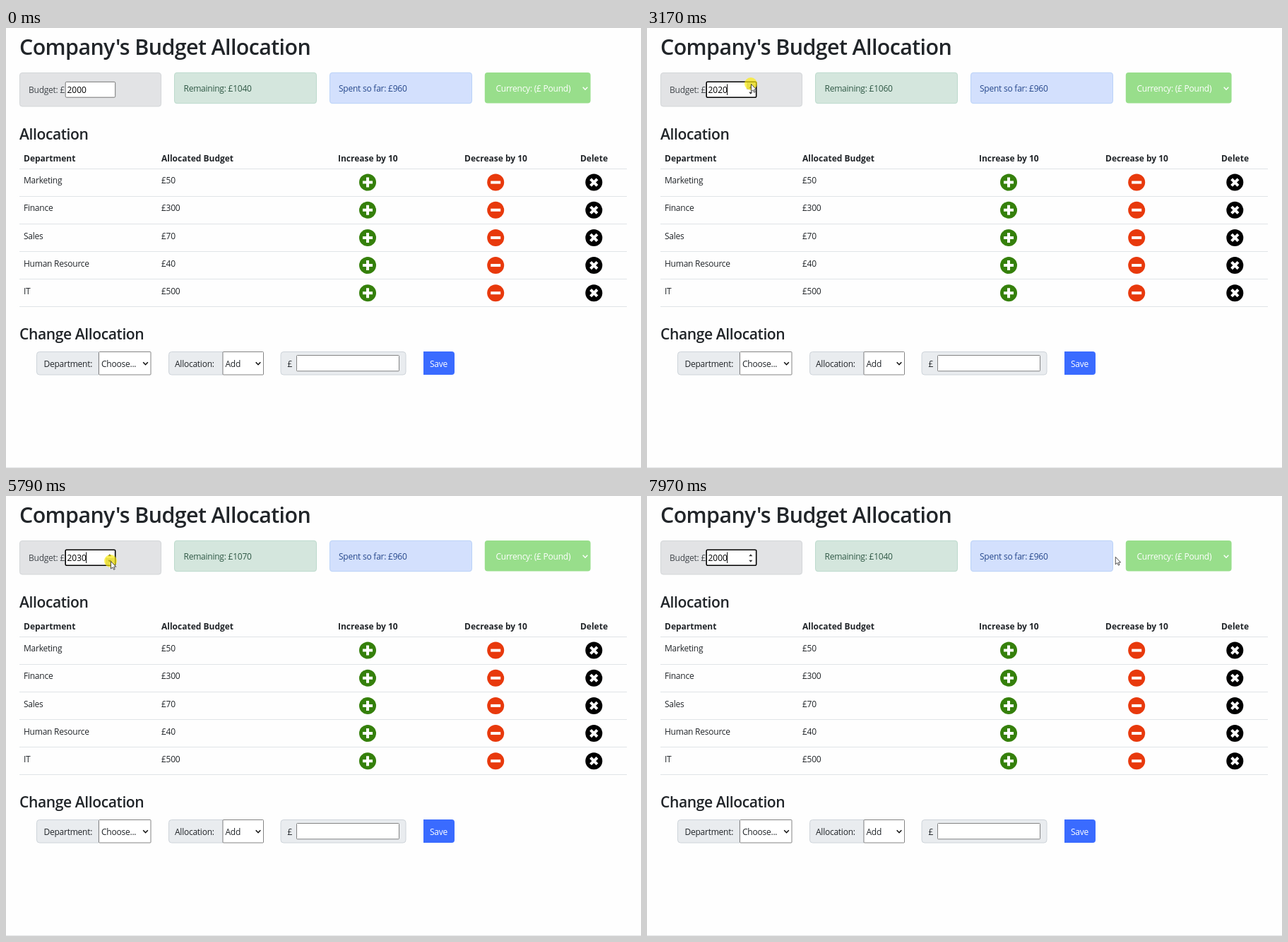
An HTML page that plays this animation: 899x623 px, repeating every 8 s.

```html
<!DOCTYPE html>
<html lang="en">
<head>
<meta charset="utf-8">
<title>Budget Allocation</title>
<style>
  html, body { margin: 0; width: 100%; height: 100%; overflow: hidden; background: #fefefe; }
  svg { display: block; width: 899px; height: 623px; }
  text { font: 12px "Open Sans", "Noto Sans", sans-serif; letter-spacing: -.02em; fill: #212529; white-space: pre; }
  .h1 { font-size: 30.4px; font-weight: 600; }
  .h2 { font-size: 21.1px; font-weight: 600; }
  .th { font-weight: 700; letter-spacing: 0; }
  .mid { text-anchor: middle; }
  .light { fill: #fff; }
  .digits { letter-spacing: 0; fill: #000; }
  .line { stroke: #e0e4e7; }
  .label { fill: #e9ecef; stroke: #ced4da; }
  .field { fill: #fff; stroke: #767676; stroke-width: .9; }
  .chevron { fill: none; stroke: #111; stroke-width: 1.6; }
  .glyph { fill: none; stroke: #fff; stroke-width: 4; }
  #input { fill: #fff; stroke: #767676; }
  #input.focused { stroke: #000; stroke-width: 1.6; }
</style>
</head>
<body>
<svg viewBox="0 0 899 623">
  <defs>
    <path id="chev" d="M-3.3-1.7L0 1.7L3.3-1.7"/>
    <g id="plus"><circle r="12" fill="#35800b"/><path class="glyph" d="M-7 0H7M0-7V7"/></g>
    <g id="minus"><circle r="12" fill="#e8390c"/><path class="glyph" d="M-7 0H7"/></g>
    <g id="cross"><circle r="12" fill="#000"/><path class="glyph" d="M-4.7-4.7L4.7 4.7M4.7-4.7L-4.7 4.7"/></g>
  </defs>

  <text class="h1" x="19" y="38">Company's Budget Allocation</text>

  <rect x="19.5" y="63.5" width="200" height="47.5" rx="3.5" fill="#e2e3e5" stroke="#d3d6d8"/>
  <text x="32" y="92" style="fill:#41464b">Budget: £</text>
  <rect x="238.5" y="63.3" width="201" height="43.4" rx="3.5" fill="#d4e6dd" stroke="#bcdacc"/>
  <text id="left" x="251.5" y="90" style="fill:#2f5845"></text>
  <rect x="458.5" y="63.3" width="201" height="43.4" rx="3.5" fill="#d3e0fd" stroke="#b9d2f8"/>
  <text x="471" y="90" style="fill:#27488c">Spent so far: £960</text>
  <rect x="677.8" y="62.9" width="149.8" height="43.7" rx="4" fill="#98de8b"/>
  <text class="light" x="693.5" y="90">Currency: (£ Pound)</text>
  <use href="#chev" class="chevron" x="820" y="85.5" style="stroke:#fff;stroke-width:1.4"/>

  <text class="h2" x="19" y="158">Allocation</text>
  <text class="th" x="25" y="188.5">Department</text>
  <text class="th" x="220" y="188.5">Allocated Budget</text>
  <text class="th mid" x="512.3" y="188.5">Increase by 10</text>
  <text class="th mid" x="693.5" y="188.5">Decrease by 10</text>
  <text class="th mid" x="832.5" y="188.5">Delete</text>
  <path class="line" d="M19 199.5H879"/>
  <g id="rows"></g>

  <text class="h2" x="19" y="441">Change Allocation</text>
  <path class="label" d="M131 458.5H47.5a4 4 0 0 0-4 4V487a4 4 0 0 0 4 4H131z"/>
  <text x="53.5" y="479.5">Department:</text>
  <rect class="field" x="131.5" y="458.5" width="73.5" height="32.5" rx="1"/>
  <text x="135" y="479.5">Choose...</text>
  <use href="#chev" class="chevron" x="197.5" y="475"/>
  <path class="label" d="M307 458.5H234.5a4 4 0 0 0-4 4V487a4 4 0 0 0 4 4H307z"/>
  <text x="239" y="479.5">Allocation:</text>
  <rect class="field" x="307" y="458.5" width="57.5" height="32.5" rx="1"/>
  <text x="310.5" y="479.5">Add</text>
  <use href="#chev" class="chevron" x="357" y="475"/>
  <rect class="label" x="389" y="458.5" width="177" height="32.5" rx="4"/>
  <text x="398.5" y="479.5">£</text>
  <rect class="field" x="411.5" y="463.5" width="145" height="22.3" rx="1"/>
  <path fill="#3a6bff" d="M591 458H631a4 4 0 0 1 4 4V487a4 4 0 0 1-4 4H591z"/>
  <text class="light" x="600" y="479.5">Save</text>
  <path d="M0 622.5H899" stroke="#e4e6e8"/>

  <rect id="input" x="84.2" y="76.3" width="70.5" height="21.9" rx="1.5"/>
  <text id="budget" class="digits" x="86.5" y="92"></text>
  <path id="caret" d="M113.7 79.5V95" stroke="#000"/>
  <g id="spinner">
    <rect id="hover" x="141" width="12.8" height="9.8" fill="#c4c4c4"/>
    <path d="M144.2 85.2L146.8 82.2L149.4 85.2zM144.2 90.8L146.8 93.8L149.4 90.8z" fill="#333"/>
  </g>
  <circle id="glow" r="9" fill="#ffee00" opacity=".65"/>
  <path id="arrow" d="M.5.5V11L3 8.8L4.6 12.3L6.2 11.6L4.7 8.2H7.8z" fill="#fff" stroke="#222" stroke-width=".8"/>
</svg>
<script>
const LOOP = 8000, FRAME = 70, BLINK = 530, HOLD = 130, SPENT = 960;
const el = id => document.getElementById(id);
const show = (id, on) => el(id).style.display = on ? '' : 'none';

const departments = { Marketing: 50, Finance: 300, Sales: 70, 'Human Resource': 40, IT: 500 };
el('rows').innerHTML = Object.entries(departments).map(([name, sum], i) => {
  const y = 218.6 + i * 39.15;
  return `<text x="25" y="${y + 1.6}">${name}</text><text x="220" y="${y + 1.6}">£${sum}</text>
    <use href="#plus" x="512" y="${y}"/><use href="#minus" x="693.2" y="${y}"/><use href="#cross" x="832.3" y="${y}"/>
    <path class="line" d="M19 ${Math.floor(y + 19.6) + .5}H879"/>`;
}).join('');

// The pointer glides to each stop and rests there until the next glide begins
const stops = [
  { from: 790, to: 1070, x: 466, y: 387 },
  { from: 1400, to: 1680, x: 267, y: 216 },
  { from: 1750, to: 2170, x: 154, y: 84 },
  { from: 2240, to: 2380, x: 147, y: 79 },
  { from: 4360, to: 4640, x: 164, y: 103 },
  { from: 4900, to: 5320, x: 148, y: 92 },
  { from: 6930, to: 6930, x: 180, y: 96 },
  { from: 7140, to: 7970, x: 703, y: 85 }
];

// Two bursts of five evenly spaced clicks, up and then down
const burst = (start, gap, change) =>
  Array.from({ length: 5 }, (_, i) => ({ time: start + i * gap, change }));
const clicks = [...burst(2840, 245, 10), ...burst(5460, 285, -10)];

function pointer(t) {
  let x = 930, y = 648;
  for (const stop of stops) {
    if (t < stop.from) break;
    const steps = Math.round((stop.to - stop.from) / FRAME) + 1;
    const p = Math.min(1, (Math.floor((t - stop.from) / FRAME) + 1) / steps);
    x += (stop.x - x) * p;
    y += (stop.y - y) * p;
  }
  return [x, y];
}

function draw(t) {
  const [x, y] = pointer(t);
  const past = clicks.filter(c => t >= c.time);
  const focused = past.length > 0;
  const sinceClick = focused ? t - past[past.length - 1].time : Infinity;
  const budget = past.reduce((sum, c) => sum + c.change, 2000);
  const onSpin = x > 141 && x < 154 && y > 76 && y < 98;

  el('budget').textContent = budget;
  el('left').textContent = 'Remaining: £' + (budget - SPENT);
  el('input').classList.toggle('focused', focused);
  show('caret', focused && Math.floor(sinceClick / BLINK) % 2 === 0);
  show('spinner', focused || onSpin);
  show('hover', onSpin);
  el('hover').setAttribute('y', y < 87 ? 77.2 : 87.4);
  show('glow', sinceClick < HOLD);
  show('arrow', t >= stops[0].from);
  for (const id of ['glow', 'arrow']) el(id).setAttribute('transform', `translate(${x} ${y})`);
}

function tick() {
  draw(performance.now() % LOOP);
  requestAnimationFrame(tick);
}
tick();
</script>
</body>
</html>
```
